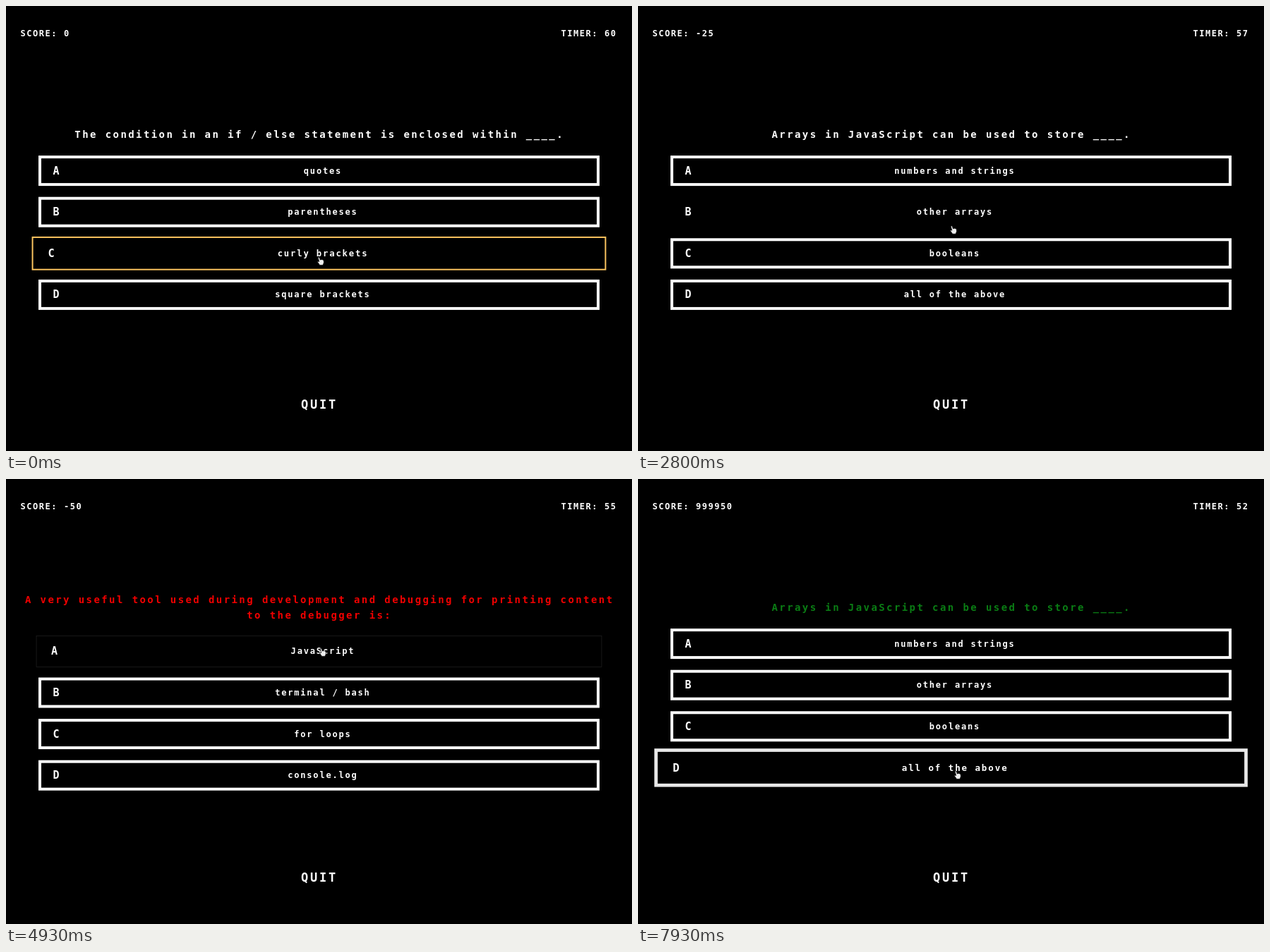
Recreate the animation shown at these times as an HTML page. Size 887 px wide and 631 px high, loop 8 s.

```html
<!DOCTYPE html>
<html lang="en">
<head>
<meta charset="utf-8">
<title>Quiz</title>
<style>
  html, body { margin: 0; width: 100%; height: 100%; overflow: hidden; background: #000; }
  svg { display: block; width: 887px; height: 631px; }
  text { font: bold 12px "DejaVu Sans Mono", monospace; fill: #fff; }
  .status { letter-spacing: 1.55px; }
  .question { font-size: 14px; letter-spacing: 2.41px; text-anchor: middle; }
  .answer { letter-spacing: 1.8px; text-anchor: middle; }
  .key { font-size: 15px; text-anchor: middle; }
  .quit { font-size: 17px; letter-spacing: 2.8px; text-anchor: middle; }
</style>
</head>
<body>
<svg id="stage" viewBox="0 0 887 631"></svg>
<script>
const LOOP = 8000, PULSE = 1000, CENTER = 443.5;
const BOX = { width: 795, height: 43, pitch: 58.6 };
const stage = document.getElementById('stage');

const condition = {
  lines: ['The condition in an if / else statement is enclosed within ____.'],
  answers: ['quotes', 'parentheses', 'curly brackets', 'square brackets']
};
const arrays = {
  lines: ['Arrays in JavaScript can be used to store ____.'],
  answers: ['numbers and strings', 'other arrays', 'booleans', 'all of the above']
};
const debugging = {
  lines: ['A very useful tool used during development and debugging for printing content',
          'to the debugger is:'],
  answers: ['JavaScript', 'terminal / bash', 'for loops', 'console.log']
};

const rounds = [
  { at: -5000, quiz: condition, score: 0, flash: '#fff' },
  { at: 200, quiz: arrays, score: -25, flash: '#f00000' },
  { at: 3900, quiz: debugging, score: -50, flash: '#f00000' },
  { at: 7550, quiz: arrays, score: 999950, flash: '#0a7d14' }
];

// Highlighted answer; each pulse starts when its answer is entered.
const hovers = [
  { at: -680, row: 2 }, { at: 2800, row: 1 }, { at: 2870, row: 0 },
  { at: 6440, row: 1 }, { at: 6500, row: 2 }, { at: 6610, row: 3 }
];

// Pointer fingertip: time, x, y, visible
const pointer = [
  [0, 443, 356, 1], [1100, 443, 356, 0], [2600, 443, 356, 1], [2740, 443, 356, 1],
  [2900, 446, 240, 1], [5000, 446, 240, 1], [5150, 447, 269, 1], [5400, 447, 269, 0],
  [6380, 447, 269, 1], [6660, 451, 413, 1], [7100, 451, 413, 1], [7400, 450, 414, 1],
  [LOOP, 450, 414, 1]
];

const latest = (list, t) => list.filter(item => item.at <= t).pop();
const mix = (a, b, k) => a + (b - a) * k;
const mixColor = (a, b, k) => `rgb(${a.map((v, i) => Math.round(mix(v, b[i], k)))})`;

// The CSS "ease" curve
function ease(x) {
  const bezier = (a, b, u) => 3 * (1 - u) ** 2 * u * a + 3 * (1 - u) * u * u * b + u ** 3;
  let low = 0, high = 1;
  for (let i = 0; i < 20; i++) {
    const mid = (low + high) / 2;
    if (bezier(0.25, 0.25, mid) < x) low = mid; else high = mid;
  }
  return bezier(0.1, 1, low);
}

function pulse(elapsed) {
  const phase = elapsed % PULSE / PULSE * 2;
  const k = ease(phase % 1), white = [255, 255, 255];
  return phase < 1
    ? { size: k, color: mixColor([0, 0, 0], white, k) }
    : { size: 1 - k, color: mixColor(white, [255, 165, 0], k) };
}

const text = (kind, x, y, content, fill = '#fff') =>
  `<text class="${kind}" x="${x}" y="${y}" style="fill:${fill}">${content}</text>`;

function frame(width, height, line, color) {
  return `<rect x="${-width / 2}" y="${-height / 2}" width="${width}" height="${height}"
    fill="none" stroke="${color}" stroke-width="${line}"/>`;
}

function button(row, y, answer, glow) {
  const { width, height } = BOX;
  const scale = glow ? 1 + 0.05 * glow.size : 1;
  const line = glow ? 5.2 * glow.size : 4;
  const border = glow
    ? frame(width * scale + line, height * scale + line, line, glow.color)
    : frame(width - line, height - line, line, '#fff');
  return `<g transform="translate(${CENTER} ${y})">${border}<g transform="scale(${scale})">
    ${text('key', -372.5, 5, 'ABCD'[row])}${text('answer', 5.4, 4, answer)}</g></g>`;
}

function question({ lines }, color) {
  const top = 187 - (lines.length - 1) * 10.8;
  return lines.map((line, i) => text('question', CENTER + 0.7, top + i * 21.6, line, color)).join('');
}

function hand(t) {
  const i = pointer.findLastIndex(p => p[0] <= t);
  const from = pointer[i], to = pointer[i + 1];
  if (!from[3]) return '';
  const k = (t - from[0]) / (to[0] - from[0]);
  return `<path transform="translate(${mix(from[1], to[1], k)} ${mix(from[2], to[2], k)})"
    d="M-1 .5Q0-.7 1.2 .7L2.3 4 4.5 3.4 6.2 4 7.2 5 7.4 8 6 11.4H1.6L-1.6 7Q-1.6 5.4 .7 6.4Z"
    fill="#eee" stroke="#000" stroke-width=".7"/>`;
}

function render(t) {
  const { at, quiz, score, flash } = latest(rounds, t);
  const hover = latest(hovers, t);
  const since = t - at;
  const blinking = since < 2000;
  const shown = !blinking || since % 1000 < 500 || flash === '#fff';
  const firstRow = 233.6 + (quiz.lines.length - 1) * 10.8;
  const timer = 60 - Math.floor((t + 470) / 1000);

  stage.innerHTML =
    text('status', 20.5, 43, `SCORE: ${score}`) +
    text('status', 786.5, 43, `TIMER: ${timer}`) +
    (shown ? question(quiz, blinking ? flash : '#fff') : '') +
    quiz.answers.map((answer, row) => button(row, firstRow + row * BOX.pitch, answer,
      row === hover.row ? pulse(t - hover.at) : null)).join('') +
    text('quit', CENTER + 0.6, 571, 'QUIT') +
    hand(t);
}

const start = performance.now();
function tick() {
  render((performance.now() - start) % LOOP);
  requestAnimationFrame(tick);
}
tick();
</script>
</body>
</html>
```
